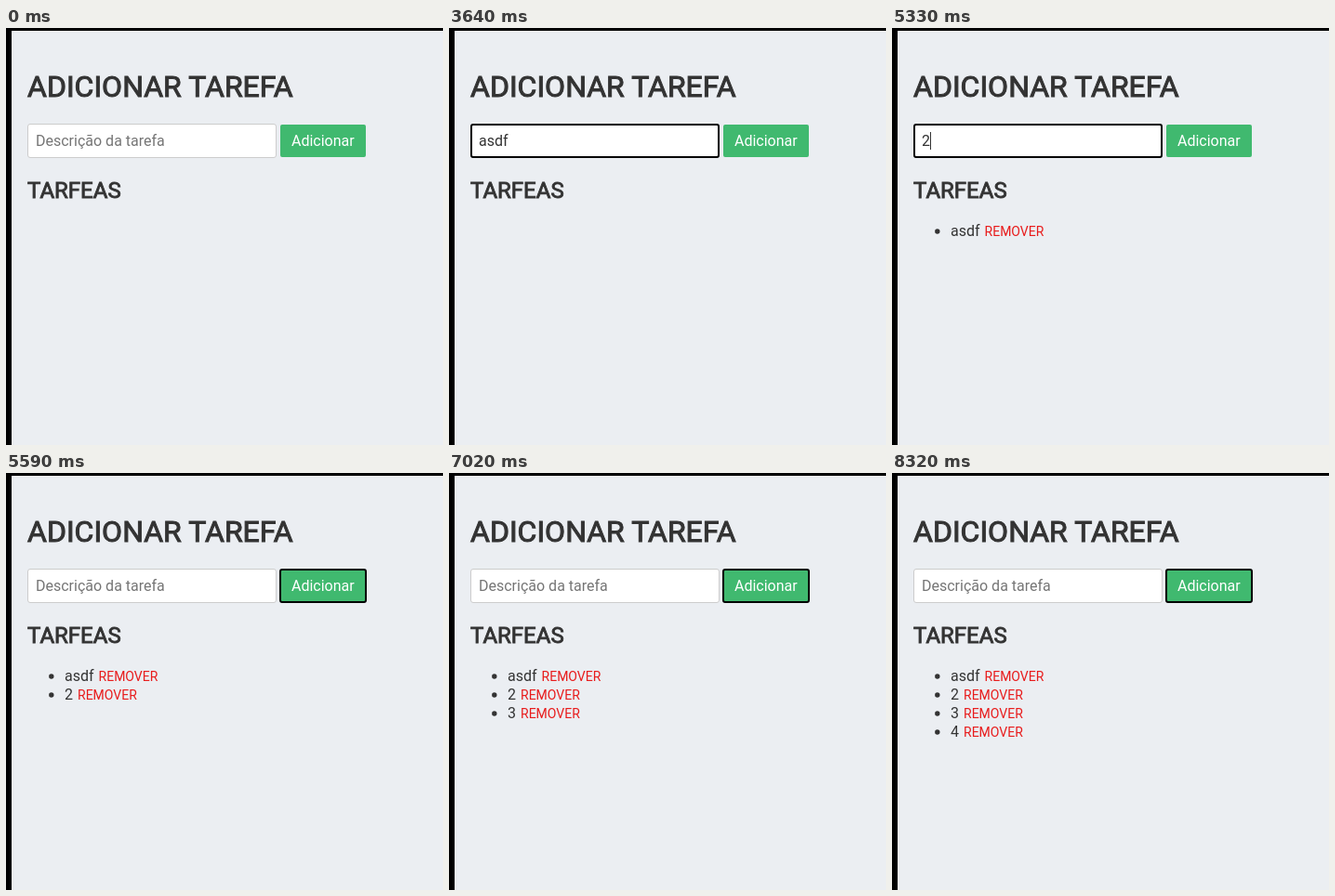
An HTML page for the animation above (9100 ms loop, 470 px wide and 449 px high).

```html
<!DOCTYPE html>
<html lang="pt">
<head>
<meta charset="utf-8">
<title>Adicionar tarefa</title>
<style>
  html, body { margin: 0; width: 100%; height: 100%; overflow: hidden; background: #000; }
  svg { display: block; }
  text { font: 16px Roboto, sans-serif; fill: #333; }
  .title, .subtitle { stroke: #333; }
  .title { font-size: 32px; stroke-width: 1px; }
  .subtitle { font-size: 24px; stroke-width: .86px; }
  .hint { fill: #757575; }
  .label { fill: #fff; }
  .remove { font-size: 14px; fill: #e81c1c; }
  .ring { fill: none; stroke: #000; stroke-width: 2; }
  .disc, .caret { fill: #333; }
  .off { display: none; }
</style>
</head>
<body>
<svg width="470" height="449" viewBox="0 0 470 449">
  <rect x="6" y="3" width="464" height="446" fill="#ebeef2"/>
  <text class="title" x="23" y="74">ADICIONAR TAREFA</text>

  <rect x="23.5" y="103.5" width="267" height="36" rx="2.5" fill="#fff" stroke="#ccc"/>
  <rect id="fieldRing" class="ring" x="24" y="104" width="266" height="35" rx="2"/>
  <text id="hint" class="hint" x="32" y="127">Descrição da tarefa</text>
  <text id="typed" x="32" y="127"></text>
  <rect id="caret" class="caret" y="112" width="1" height="19"/>

  <rect x="295" y="104" width="92" height="35" rx="2" fill="#40b96f"/>
  <rect id="buttonRing" class="ring" x="295" y="104" width="92" height="35" rx="2"/>
  <text class="label" x="307" y="127">Adicionar</text>

  <text class="subtitle" x="23" y="183">TARFEAS</text>
  <g id="list"></g>
</svg>
<script>
  const LOOP = 9100;
  const tasks = ['asdf', '2', '3', '4'];

  // start time, typed text, focused control, caret visible, tasks in list
  const steps = [
    [0, '', '', false, 0],
    [2600, '', 'field', true, 0],
    [2990, 'as', 'field', true, 0],
    [3120, 'asdf', 'field', true, 0],
    [3640, 'asdf', 'field', false, 0],
    [3900, '', 'button', false, 1],
    [4420, '', 'field', true, 1],
    [4940, '', 'field', false, 1],
    [5330, '2', 'field', true, 1],
    [5590, '', 'button', false, 2],
    [6110, '', 'field', true, 2],
    [6240, '3', 'field', true, 2],
    [6890, '', 'button', false, 3],
    [7540, '', 'field', true, 3],
    [7670, '4', 'field', true, 3],
    [8320, '', 'button', false, 4]
  ];

  const el = id => document.getElementById(id);
  const show = (node, on) => node.classList.toggle('off', !on);
  const list = el('list'), typed = el('typed'), caret = el('caret');

  list.innerHTML = tasks.map((task, i) => `<g>
    <circle class="disc" cx="48.8" cy="${219 + i * 20}" r="2.7"/>
    <text x="63" y="${224 + i * 20}">${task}<tspan class="remove" dx="5">REMOVER</tspan></text>
  </g>`).join('');

  function render(time) {
    const [, text, focus, blink, count] = steps.findLast(step => step[0] <= time);
    typed.textContent = text;
    show(el('hint'), !text);
    show(el('fieldRing'), focus === 'field');
    show(el('buttonRing'), focus === 'button');
    show(caret, blink);
    caret.setAttribute('x', 32 + Math.round(text ? typed.getComputedTextLength() : 0));
    [...list.children].forEach((item, i) => show(item, i < count));
  }

  const start = performance.now();
  function tick() {
    render((performance.now() - start) % LOOP);
    requestAnimationFrame(tick);
  }
  tick();
</script>
</body>
</html>
```
